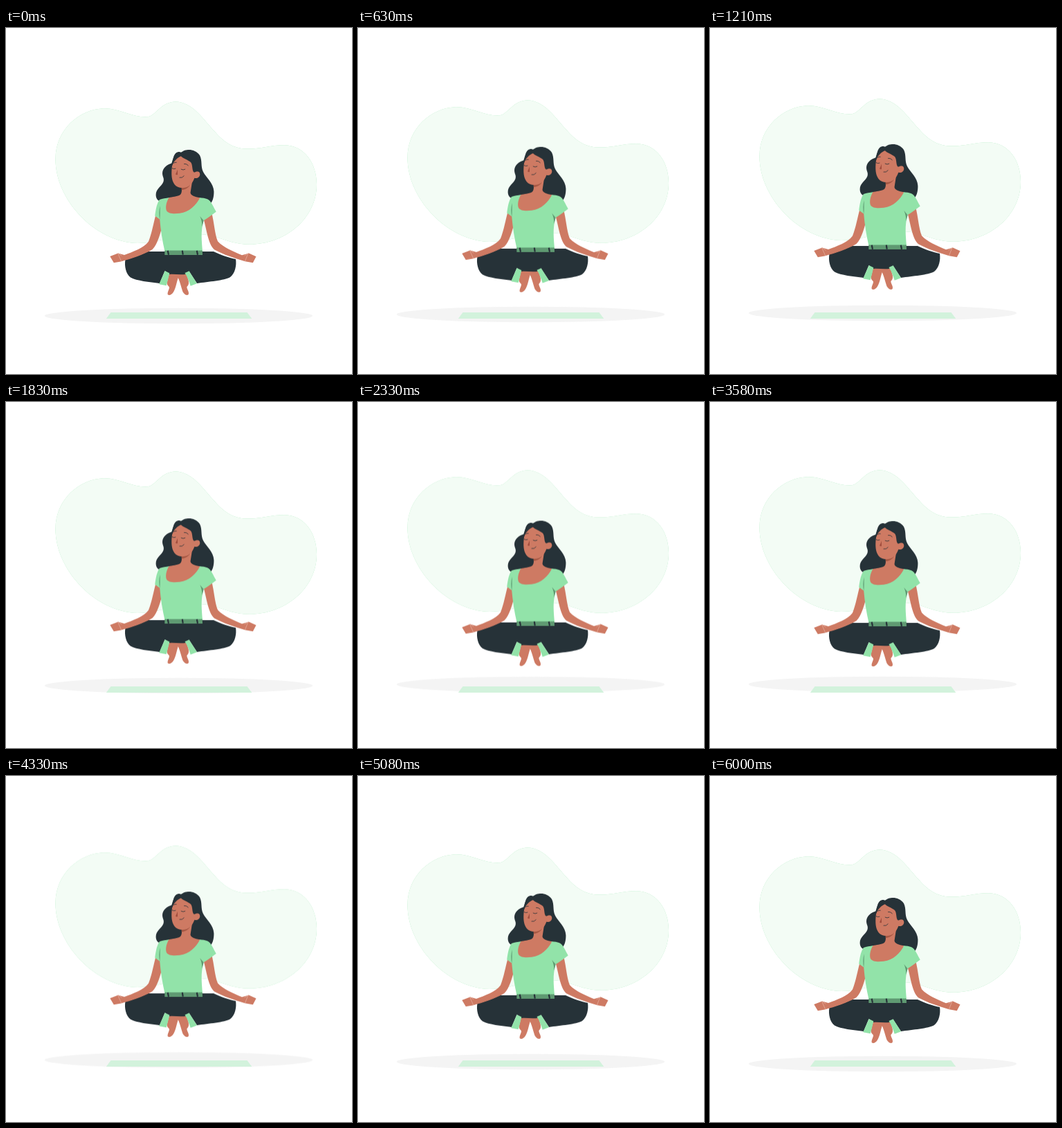
An HTML page for the animation above (6.04 s loop, 500 by 500 pixels).

```html
<!DOCTYPE html>
<html lang="en">
<head>
<meta charset="utf-8">
<title>Floating meditation</title>
<style>
  html, body { margin: 0; width: 100%; height: 100%; overflow: hidden; background: #fff; }
  svg { display: block; width: 100%; height: 100%; }

  .drift { animation: drift 6040ms linear infinite; }
  .bob { animation: bob 6040ms linear infinite; }

  /* Each cycle rests for its last 40 ms */
  @keyframes drift {
    0%, 99.338%, 100% { transform: translateY(0); }
    49.669% { transform: translateY(-10px); }
  }
  @keyframes bob {
    0%, 49.669%, 99.338%, 100% { transform: translateY(0); }
    24.834%, 74.503% { transform: translateY(-10px); }
  }

  .dark { fill: #263238; }
  .skin { fill: #ce7a63; }
  .green { fill: #92e3a9; }
  .shade { fill: #5f9a72; }
  .line { fill: none; stroke: #263238; stroke-width: .8; stroke-linecap: round; stroke-linejoin: round; }
  .crease { fill: none; stroke: #e9b5a6; stroke-width: .7; stroke-linecap: round; }
</style>
</head>
<body>
<svg viewBox="0 0 500 500">
  <defs>
    <path id="blob" d="M71.5 189C72 145 107 118 140 116.2C163 115 184 130 205 128.3
      C216 127 224 106.5 245 106.5C270 107 285 132 302 150C316 166 329 174.5 350 174.6
      C369 174.5 383 169 403 169.2C432 170 449 196 449 226C449 276 403 313 351 312.8
      C333 312.5 318 307 304 302C284 295 258 298 238 303C222 307 207 311 190 311
      C127 309 71 247 71.5 189Z"/>
  </defs>

  <g class="drift">
    <use href="#blob" class="green"/>
    <use href="#blob" fill="#fff" opacity=".89"/>
    <ellipse cx="249.5" cy="416" rx="193.7" ry="11.3" fill="#f4f4f4"/>
  </g>

  <path d="M151.5 411H348.5L355.3 420H144.8Z" fill="#d2f2dc"/>

  <g class="bob">
    <!-- hair behind -->
    <path class="dark" d="M241 195C232 197 226 203 226 210C226 215 229 217 227.5 222C225 229 216.6 232 216.6 241
      C216.6 247 220 250 224 251L296 253C299 250 300.6 243 300.4 236C300 224 289 216 285 208
      C281 200 284 192 280 184C276 178 269 175.6 263 176C258 176.3 256 178 253 179.7
      C249 178 244.5 180 243 185C241 190 240 193 241 195Z"/>

    <!-- legs and feet -->
    <path class="skin" d="M236 354H262C260.5 359 264.5 363 264 369C263.5 373 261.2 373 261.4 375
      C262 378 265 382 263.7 385C261 387.8 256.5 384 255 380C253 374 251.5 367 248.8 361
      C246.5 367 245.5 376 242 381.5C239.5 385.5 236 387 233.8 385.3C232.8 382 236 378 236 374.8
      C235.8 373 232.3 372 232.6 368Z"/>
    <path class="dark" d="M205 323H300C310 328 323 332 332 334C333.5 343 331 355 324 360
      C315 365 293 366.5 276 369L264.5 351.5L261 355.5C252 357.5 244 355 236 356L229.5 351
      L222 369C207 367 189 365.5 180 360.5C173 355 171 344 172.4 335C183 332 195 328 205 323Z"/>
    <path class="green" d="M229.7 351L236.3 354.2C235 360 233.5 366 231.7 372.3L221.2 370.3Z"/>
    <path class="green" d="M258.4 354L264.6 351.2L276 369.2L266.7 372.8C264.5 366 262 359 258.4 354Z"/>

    <!-- arms -->
    <path class="skin" d="M217 268C213 282 211 296 206 308.5C199 318 183 323.5 171 328L162 325.4L150.3 330
      L155.8 339.2L166 337.4C181 333.5 198 328 211.5 320C219 313 223 297 227 282Z"/>
    <path class="skin" d="M297 266C301 282 301.5 297 306 308.3C314 317 328 323 341 328.2L351 325.4L361.5 330.2
      L356.8 339.3L345.5 337.2C331 333 314 327.5 301 320.3C292 312 290 291 285 274Z"/>
    <path class="crease" d="M161.7 326L166.6 336.8M162 325.5L167 329M349.8 326L345.5 336.7M350 325.5L345 329"/>

    <!-- shirt -->
    <path class="green" d="M222 248C226 246.5 231 246 236 245H279C284 245.5 288 246 291 247.3
      C297 250 299.5 259 303.7 265.4C298 270 292 274 285.5 278.3C281 294 283 309 284 323H229.5
      C226 308 223.5 292 222.2 276.5L215.2 271.5C216.5 262 218 253 222 248Z"/>
    <path class="shade" d="M280.3 272L285.6 278.2L283.4 287C283.3 281 282.5 277 280.3 272Z"/>
    <path class="shade" d="M222.7 257C221 264 221 270 222.2 277C223 270 222.4 263 222.7 257Z"/>
    <path class="shade" d="M229.3 321.5H283.7L284 328H229.3Z"/>
    <path d="M233.7 321.7L235 327.7M254.8 321.7L255.7 327.7M275.8 321.7L277 327.7" fill="none" stroke="#263238" stroke-width="2.2"/>

    <!-- neck and face -->
    <path class="skin" d="M253.5 226C254 233 255 239 251 241.5C247 243.5 240 244 235.3 245.3
      C232 251 230 259 232 264C235 269 244 268.5 251 267.8C265 266 275 256 280.2 245.3
      C273 244 267 242 266.5 238L269 222Z"/>
    <path d="M253.6 230.6C258 231 263 229 266 226.5C263 232 258 234 253.8 234Z" fill="#a65844"/>
    <path class="skin" d="M253 185C245 187 240.5 194 239.7 202C238.8 211 239 220 243.5 226
      C247 231 255 232.2 261 230C267 227.5 270.5 222 272.3 216.7C276 218 280.2 215.5 280.3 211.4
      C280.4 207.3 275.5 206 272.4 209L271 193L262 187Z"/>
    <path class="dark" d="M252.5 184.8C256 189 263 190.5 267 194C270 198 268.5 204 271.2 208.5
      C272.7 207.4 274.5 207.2 276.5 207.3L282 205L279 184L261 179Z"/>
    <path class="dark" d="M253.5 184.7C248 187.5 243 191 240.3 198.5L238.5 198L243 184L250 180Z"/>
    <path class="line" d="M240.2 202.8Q242.5 204.4 245 203.2M253.2 204.2Q256 206 258.8 204.2
      M242.2 195.2Q244 193.7 246.2 194.2M257.5 196.3Q261 195.8 263.3 198.7M251 216.2Q254.8 217.2 257.2 213.8"/>
    <path d="M248 204.5Q246.5 208.5 245 211.3Q246.2 212.7 248 211.9Z" fill="#a24e3e"/>
  </g>
</svg>
</body>
</html>
```
